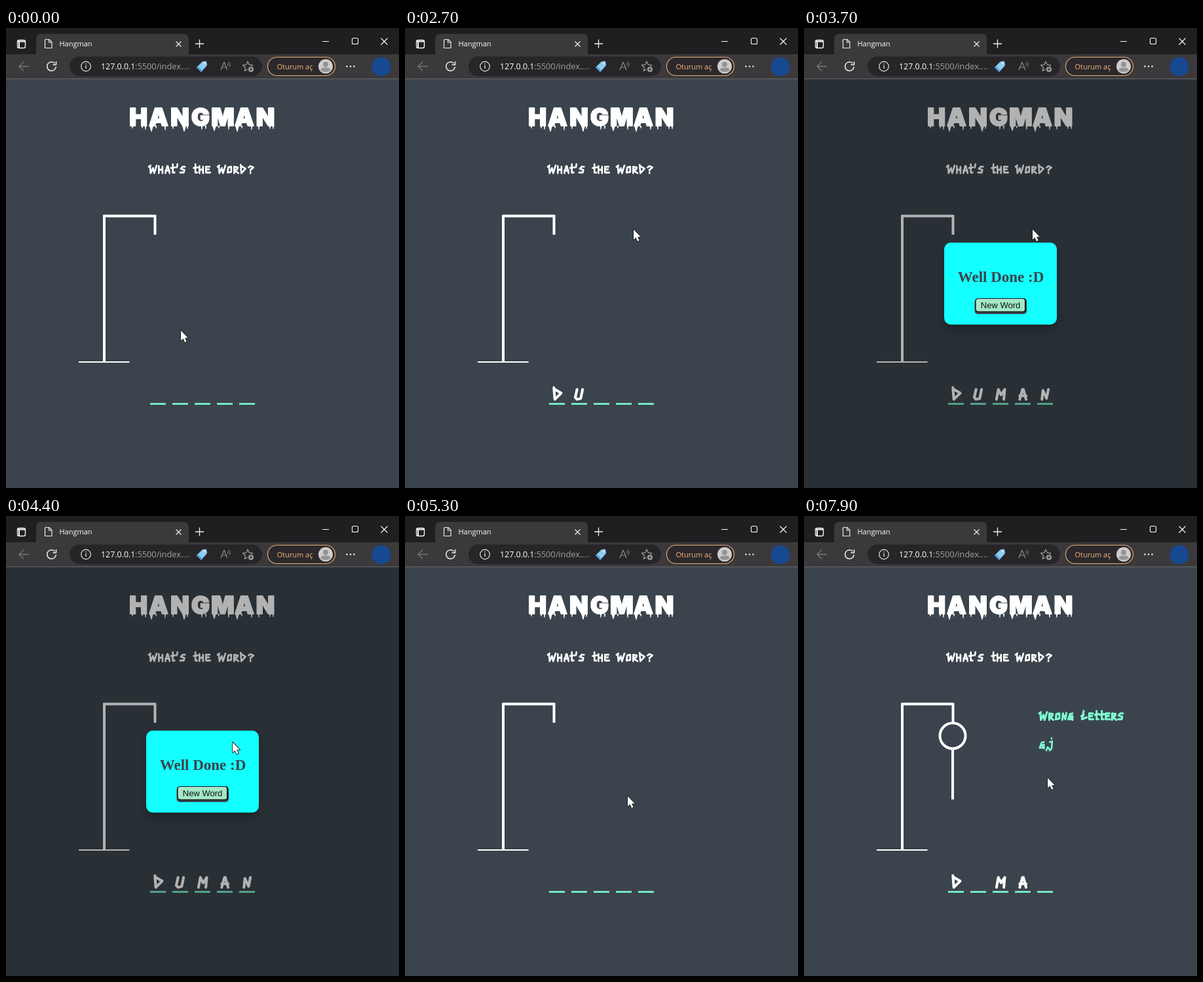
An HTML page with a canvas that plays this animation: 600 px wide and 701 px high, repeating every 8000 ms.

```html
<!DOCTYPE html>
<html lang="en">
<head>
<meta charset="utf-8">
<title>Hangman</title>
<style>
html, body { margin: 0; width: 600px; height: 701px; overflow: hidden; background: #3b444c; }
canvas { display: block; }
</style>
</head>
<body>
<canvas id="stage" width="600" height="701" aria-label="Hangman. What's the word?"></canvas>
<script>
const ctx = document.getElementById('stage').getContext('2d');
const LOOP = 8000, STEP = 100;
const WIN = 3700, RESET = 5300;
const UI = '"Open Sans", "Noto Sans", sans-serif';
const WORD = 'DUMAN';
const AQUA = '#7fffd4';

// key presses: [time, letter]
const firstRound = [[2100, 'D'], [2500, 'U'], [2900, 'M'], [3300, 'A'], [WIN, 'N']];
const secondRound = [[5900, 'D'], [6300, 'G'], [6900, 'M'], [7300, 'A'], [7700, 'J']];

// pointer stops: [time, x, y]
const stops = [[0, 267, 461], [400, 267, 461], [1400, 352, 299], [1800, 352, 299], [2100, 349, 307],
  [4100, 349, 307], [4900, 340, 427], [5400, 340, 427], [6100, 372, 399], [LOOP, 372, 399]];

// hand lettering, strokes on a 10 x 14 grid
const glyphs = {
  W: 'M2 2L3 13L7 5L9 13L13 1M0 3L3 1', H: 'M2 2L2 13M2 8L8 7M8 3L8 13', A: 'M2 13L5 2L6 2L9 13M2 9L9 9',
  T: 'M4 -1L4 12L7 12M1 5L8 4', "'": 'M3 -1L2 4', S: 'M9 3L5 3L2 6L8 8L7 12L1 12',
  E: 'M8 3L2 3L2 12L9 12M2 7L7 7', O: 'M3 4L8 3L8 11L2 12Z', R: 'M2 13L2 3L8 4L7 7L2 8L9 13',
  D: 'M2 0L3 13L10 6L3 2', '?': 'M1 4L4 2L9 4L4 8L4 9M4 12L4 13', N: 'M2 13L3 3L7 12L9 2',
  G: 'M8 3L4 4L1 12L5 12L8 7L4 8M8 7L8 13', L: 'M5 -1L2 12L10 9M1 7L5 5', U: 'M3 2L1 11L3 13L7 12L9 2',
  M: 'M1 13L3 2L6 8L10 2L9 13', J: 'M6 -3L6 -2M3 3L7 2L6 13L3 16L1 12', ',': 'M3 11L1 16'
};
const advance = { W: 13.5, T: 8, "'": 6, E: 9.5, A: 9.5, L: 11, ',': 3.5, S: 10.5 };
for (const k in glyphs) glyphs[k] = new Path2D(glyphs[k]);

function glyph(ch, x, y, sx, sy, weight) {
  if (!glyphs[ch]) return;
  ctx.save();
  ctx.translate(x, y);
  ctx.scale(sx, sy);
  ctx.lineWidth = weight / Math.sqrt(sx * sy);
  ctx.lineJoin = ctx.lineCap = 'round';
  ctx.stroke(glyphs[ch]);
  ctx.restore();
}

function lettering(str, x, y, color, weight) {
  ctx.strokeStyle = color;
  for (const ch of str) {
    glyph(ch, x, y, 0.92, 0.98, weight);
    x += advance[ch] || 10;
  }
}

function line(color, width, d) {
  ctx.strokeStyle = color;
  ctx.lineWidth = width;
  ctx.stroke(new Path2D(d));
}

function shape(color, d) {
  ctx.fillStyle = color;
  ctx.fill(new Path2D(d));
}

function box(color, x, y, w, h, r = 0) {
  ctx.fillStyle = color;
  ctx.beginPath();
  ctx.roundRect(x, y, w, h, r);
  ctx.fill();
}

function frame(color, x, y, w, h, r, lw = 1.2) {
  ctx.strokeStyle = color;
  ctx.lineWidth = lw;
  ctx.beginPath();
  ctx.roundRect(x, y, w, h, r);
  ctx.stroke();
}

function disc(color, x, y, r) {
  ctx.fillStyle = color;
  ctx.beginPath();
  ctx.arc(x, y, r, 0, 7);
  ctx.fill();
}

function ring(color, x, y, r, lw, from = 0, to = 7) {
  ctx.strokeStyle = color;
  ctx.lineWidth = lw;
  ctx.beginPath();
  ctx.arc(x, y, r, from, to);
  ctx.stroke();
}

function text(str, x, y, font, color, align = 'left') {
  ctx.font = font;
  ctx.fillStyle = color;
  ctx.textAlign = align;
  ctx.fillText(str, x, y);
}

function titleBar() {
  box('#201e20', 0, 0, 600, 40);
  box('#3b393b', 0, 40, 600, 37);
  box('#3b393b', 46, 9, 233, 32, [7, 7, 0, 0]);
  box('#68676a', 0, 77, 600, 1);
  frame('#f2f2f2', 17.5, 18.5, 12, 12, 2.5, 1.4);
  line('#f2f2f2', 2, 'M17 20.5H30M20 20V30');
  line('#e8e8e8', 1.2, 'M60.5 17.5H66L70 21.5V30.5H59.5V18.5ZM65.5 17.5V22H70');
  text('Hangman', 81.5, 28, '500 11px ' + UI, '#fff');
  line('#eee', 1.2, 'M259.5 20.5L267.5 28.5M267.5 20.5L259.5 28.5');
  line('#f2f2f2', 1.3, 'M289 24H302M295.5 17.5V30.5');
  line('#fff', 1.1, 'M483 20.5H493M572.5 15.5L582.5 25.5M582.5 15.5L572.5 25.5');
  frame('#fff', 528.5, 15.5, 9, 9, 2, 1.1);
}

function star(x, y, r) {
  ctx.beginPath();
  for (let i = 0; i < 10; i++) {
    const a = i * Math.PI / 5 - Math.PI / 2, q = i % 2 ? r * 0.48 : r;
    ctx.lineTo(x + q * Math.cos(a), y + q * Math.sin(a));
  }
  ctx.closePath();
  ctx.stroke();
}

function toolBar() {
  line('#79777a', 1.3, 'M20 58.5H35M27 51.5L20 58.5L27 65.5');
  ring('#f2f2f2', 69.5, 58.5, 6.8, 1.5, 0.1, 5.5);
  line('#f2f2f2', 1.5, 'M76.5 51V56H71.5');
  box('#272527', 97, 43.5, 294, 30, 15);
  ring('#dedede', 122, 58.5, 7.3, 1.2);
  line('#dedede', 1.4, 'M122 57V62M122 54V55.5');
  text('127.0.0.1', 145, 63, '500 12.4px ' + UI, '#fff');
  text(':5500/index....', 197, 63, '12.8px ' + UI, '#a3a1a3');
  shape('#8ccdf0', 'M291 60L300 51L306 50.5L307 57L298 67Z');
  shape('#4fa5d8', 'M291 60L298 67L300 65L293 58Z');
  disc('#e9f7ff', 303.5, 54, 1.3);
  line('#8f8d90', 1.2, 'M328 64L333 52L338 64M330 60H336');
  ring('#8f8d90', 336, 56, 3, 1, -0.9, 0.6);
  ring('#8f8d90', 336, 56, 6, 1, -0.9, 0.6);
  ctx.strokeStyle = '#a3a1a3';
  ctx.lineWidth = 1.2;
  star(369, 59, 8);
  disc('#272527', 374, 63, 5);
  disc('#a3a1a3', 374, 63, 4);
  line('#272527', 1, 'M371.5 63H376.5M374 60.5V65.5');
  box('#2b292b', 399.5, 44.5, 103, 28, 14);
  frame('#e2aa78', 399.5, 44.5, 103, 28, 14);
  text('Oturum aç', 413.5, 62.5, '500 11px ' + UI, '#f5b67a');
  disc('#cfcdcc', 488, 58.5, 11);
  disc('#969392', 488, 55.5, 4);
  shape('#969392', 'M480.5 65Q481 60.5 485 60.5H491Q495 60.5 495.5 65Q488 69 480.5 65Z');
  for (const x of [520.5, 526, 531.5]) disc('#f2f2f2', x, 58.5, 1.2);
  disc('#16498f', 573, 59, 14.5);
}

function heading() {
  const mids = [202, 233, 265.5, 297, 331, 364, 396];
  ctx.strokeStyle = '#fff';
  ctx.lineWidth = 2;
  ctx.lineJoin = 'round';
  [...'HANGMAN'].forEach((ch, i) => {
    text(ch, mids[i], 149, '900 37px Inter, Roboto, sans-serif', '#fff', 'center');
    ctx.strokeText(ch, mids[i], 149);
  });
  // drips: x, length
  const drips = [193, 3, 208, 3, 213, 5, 222, 8, 229, 3, 243, 6, 255, 4, 272, 8, 277, 4,
    299, 5, 305, 4, 318, 7, 325, 3, 340, 5, 353, 8, 360, 3, 375, 5, 386, 5, 403, 4, 408, 4];
  for (let i = 0; i < drips.length; i += 2) {
    const x = drips[i], w = drips[i + 1] > 6 ? 3 : 1.2;
    shape('#fff', `M${x - w} 149H${x + w}L${x + 0.4} ${150 + drips[i + 1]}H${x - 0.4}Z`);
  }
  lettering("WHAT'S THE WORD", 218, 208.5, '#fff', 2.7);
  lettering('?', 369.5, 208.5, '#fff', 2.7);
}

function game(guesses) {
  const wrong = guesses.filter(ch => !WORD.includes(ch));
  line('#fff', 2, 'M111 509H188.5');
  line('#fff', 4, 'M150 509V285M148.5 286.5H228.5M227.5 285V315');
  if (wrong.length > 0) {
    ring('#fff', 227, 335, 19.5, 4);
    lettering('WRONG LETTERS', 359, 298, AQUA, 3.1);
    lettering(wrong.join(','), 359, 341.5, AQUA, 2.6);
  }
  if (wrong.length > 1) line('#fff', 4, 'M227 355V432');
  [...WORD].forEach((ch, i) => {
    const x = 220 + i * 34;
    box(AQUA, x, 571.5, 24, 2.6);
    if (!guesses.includes(ch)) return;
    ctx.strokeStyle = '#fff';
    glyph(ch, x + 4.5, 548, 1.4, 1.38, 4);
  });
}

function popup() {
  box('rgba(0,0,0,0.3)', 0, 78, 600, 623);
  ctx.save();
  ctx.shadowColor = 'rgba(0,0,0,0.28)';
  ctx.shadowBlur = 14;
  ctx.shadowOffsetY = 8;
  box('#14ffff', 214, 327, 172, 125, 10);
  ctx.restore();
  text('Well Done :D', 300.5, 387, 'bold 23px "Liberation Serif", "Times New Roman", serif', '#3b444b', 'center');
  box('#3b444b', 260.5, 412, 79.5, 24, 5);
  box('#0a0c0c', 262.5, 412, 76.5, 21, 4);
  box('#e6f7ee', 263, 413, 74, 18.5, 3);
  box('#a2e8c4', 264, 414, 73, 17.5, 2);
  text('New Word', 300, 427, '13px "Liberation Sans", Arial, sans-serif', '#111', 'center');
}

function pointerAt(t) {
  const i = stops.findIndex(s => s[0] > t);
  const [t0, x0, y0] = stops[i - 1], [t1, x1, y1] = stops[i];
  const p = (t - t0) / (t1 - t0), e = p * p * (3 - 2 * p);
  return [x0 + (x1 - x0) * e, y0 + (y1 - y0) * e];
}

function pointer(t, open) {
  const [x, y] = pointerAt(t);
  const hand = open && x > 260 && x < 341 && y > 411 && y < 436;
  const d = hand
    ? 'M-2 1.5Q0 -1.5 2 1.5V8Q4 6.5 5.5 8.5Q7.5 7.5 8.5 9.5Q10.5 9 10.5 12V16Q10 19 8 22H-1Q-3 18 -6 14Q-6.5 11 -4 12L-2 14Z'
    : 'M0 0V15.5L3.5 12.2L6 18L8.6 16.8L6.2 11.3H10.8Z';
  ctx.save();
  ctx.translate(x, y);
  ctx.lineJoin = 'round';
  line('#14171a', 1.8, d);
  shape('#fff', d);
  if (hand) line('#14171a', 0.9, 'M2 8V12M5.5 9V12M8.5 10V13');
  ctx.restore();
}

function draw(t) {
  const open = t >= WIN && t < RESET;
  const round = t < RESET ? firstRound : secondRound;
  const guesses = round.filter(k => k[0] <= t).map(k => k[1]);
  box('#3b444c', 0, 0, 600, 701);
  titleBar();
  toolBar();
  heading();
  game(guesses);
  if (open) popup();
  pointer(t, open);
}

let start;
function tick(now) {
  if (start === undefined) start = now;
  const t = (now - start) % LOOP;
  draw(Math.floor(t / STEP) * STEP);
  requestAnimationFrame(tick);
}
draw(0);
requestAnimationFrame(tick);
</script>
</body>
</html>
```
